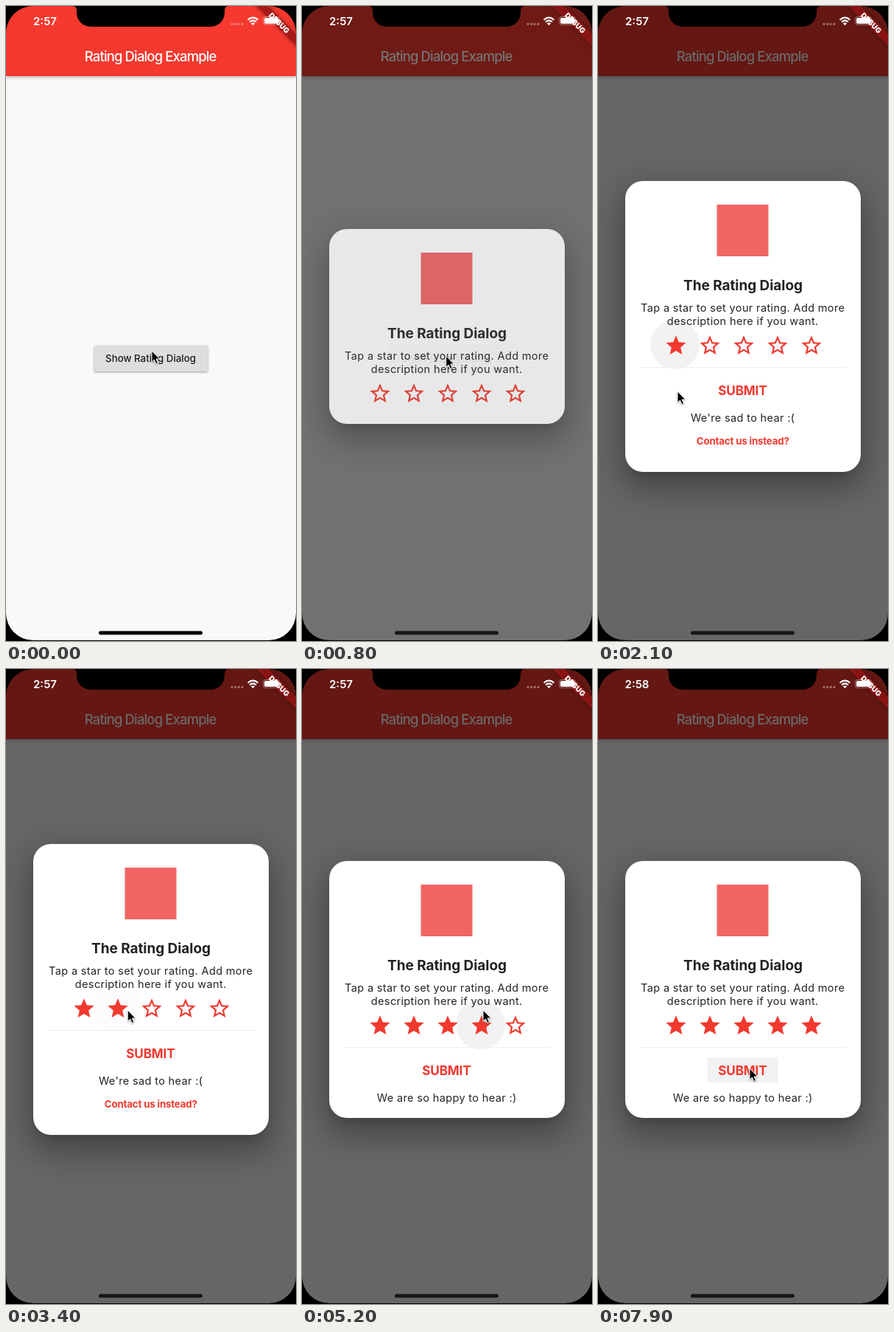
An HTML page that plays this animation: 394x860 px, repeating every 8 s.

```html
<!DOCTYPE html>
<html lang="en">
<head>
<meta charset="utf-8">
<title>Rating dialog</title>
<style>
  html, body { margin: 0; width: 100%; height: 100%; overflow: hidden; background: #000; }
  #stage { position: relative; width: 394px; height: 860px; overflow: hidden; background: #f9f9f9;
    font-family: Inter, Roboto, sans-serif; }
  #stage > * { position: absolute; }
  svg { position: absolute; left: 0; top: 0; overflow: visible; }
  text { text-anchor: middle; }
  #bar { width: 394px; height: 95px; background: #f5392f; box-shadow: 0 2px 4px rgba(0,0,0,.24); }
  #button { left: 120px; top: 460px; width: 154px; height: 34.5px; border-radius: 2px; background: #dedede;
    box-shadow: 0 1px 3px rgba(0,0,0,.4); }
  #ink { width: 100%; height: 100%; background: rgba(0,0,0,.1); }
  #scrim { width: 394px; height: 860px; background: #000; }
  #card { left: 36.5px; width: 320px; border-radius: 24px; background: #fff;
    box-shadow: 0 11px 15px -7px rgba(0,0,0,.14), 0 23px 40px 4px rgba(0,0,0,.2), 0 9px 46px 8px rgba(0,0,0,.13); }
  #card svg { left: -36.5px; }
  .body { font-size: 14.5px; letter-spacing: .36px; fill: #222; }
  .bold { font-weight: 700; }
  .red { fill: #f1392e; }
</style>
</head>
<body>
<div id="stage">
  <div id="bar"></div>
  <div id="button"><div id="ink"></div></div>
  <svg width="394" height="860">
    <text x="196.2" y="75" font-size="18.5" font-weight="500" letter-spacing="-.87" fill="#fff">Rating Dialog Example</text>
    <text x="196.5" y="482" font-size="13.3" font-weight="500" fill="#1c1c1c">Show Rating Dialog</text>
  </svg>
  <div id="scrim"></div>
  <div id="card">
    <svg width="394" height="400">
      <circle id="splash" r="33.5"/>
      <rect id="press" x="148.5" y="266" width="96" height="34" rx="2" fill="#f2f2f2"/>
      <rect x="161.5" y="32" width="70" height="70" fill="#f06563"/>
      <text class="bold" x="197" y="148" font-size="19" letter-spacing="-.06" fill="#222">The Rating Dialog</text>
      <text class="body" x="196.7" y="177">Tap a star to set your rating. Add more</text>
      <text class="body" x="196.7" y="195">description here if you want.</text>
      <g id="stars" class="red"></g>
      <g id="reply">
        <path d="M56 252.5H338" stroke="#eee"/>
        <text class="bold red" x="196.4" y="289.7" font-size="17.1" letter-spacing="-.15">SUBMIT</text>
        <text id="message" class="body" x="196.7" y="325.5"></text>
        <text id="contact" class="bold red" x="196.8" y="356.5" font-size="13.3" letter-spacing="-.18">Contact us instead?</text>
      </g>
    </svg>
  </div>
  <svg width="394" height="860">
    <defs><clipPath id="screen"><path d="M0 0H394V860H0z"/></clipPath></defs>
    <g clip-path="url(#screen)">
      <g transform="translate(394 0) rotate(45)">
        <path d="M-60 26.7H60V38H-60z" fill="#a31515" fill-opacity=".72" style="filter:drop-shadow(0 0 3px rgba(0,0,0,.5))"/>
      </g>
      <!-- status bar -->
      <text id="clock" x="53" y="26" font-size="15" font-weight="600" fill="#fff"></text>
      <g fill="#fff" fill-opacity=".35">
        <circle cx="307" cy="24.5" r="1.7"/><circle cx="311.7" cy="24.5" r="1.7"/>
        <circle cx="316.3" cy="24.5" r="1.7"/><circle cx="321" cy="24.5" r="1.7"/>
      </g>
      <g fill="none" stroke="#fff" stroke-width="2.2">
        <path d="M328.6 18.7Q335.5 12.6 342.4 18.7M331.1 21.6Q335.5 17.8 339.9 21.6"/>
      </g>
      <path d="M332.9 23.6Q335.5 21.5 338.1 23.6L335.5 26.3z" fill="#fff"/>
      <rect x="349.5" y="14.5" width="22" height="11" rx="3" fill="none" stroke="#fff" stroke-opacity=".4"/>
      <rect x="351" y="16" width="19" height="8" rx="1.8" fill="#fff"/>
      <path d="M373 18.2q2 1.8 0 3.6z" fill="#fff" fill-opacity=".5"/>
      <text transform="translate(394 0) rotate(45)" y="36" font-size="10" font-weight="900" fill="#fff">DEBUG</text>
      <!-- phone edge, notch and home indicator -->
      <path fill-rule="evenodd" d="M0 0H394V860H0zM37 0H357A37 37 0 0 1 394 37V822A37 37 0 0 1 357 859H37A37 37 0 0 1 0 822V37A37 37 0 0 1 37 0z"/>
      <path d="M90 0Q96 0 96 6V9A19 19 0 0 0 115 28H278A19 19 0 0 0 297 9V6Q297 0 303 0z"/>
      <rect id="home" x="126" y="846.5" width="141" height="5" rx="2.5"/>
    </g>
    <path id="cursor" d="M0 0V15.2L3.4 12L5.9 17.6L8.5 16.5L6.1 11H10.8z" stroke="#fff" stroke-width="1"
      style="filter:drop-shadow(0 1px 1px rgba(0,0,0,.35))"/>
  </svg>
</div>
<script>
const $ = id => document.getElementById(id);
const LOOP = 8000;
const STAR_Y = 222.8;
const starX = i => 106 + 46 * i;
const FULL = 'M12 17.27L18.18 21l-1.64-7.03L22 9.24l-7.19-.61L12 2 9.19 8.63 2 9.24l5.46 4.73L5.82 21z';
const HOLLOW = FULL + 'M12 15.4l-3.76 2.27 1-4.28-3.32-2.88 4.38-.38L12 6.1l1.71 4.04 4.38.38-3.32 2.88 1 4.28z';

const stars = [0, 1, 2, 3, 4].map(i => {
  const star = document.createElementNS('http://www.w3.org/2000/svg', 'path');
  star.setAttribute('transform', `translate(${starX(i)} ${STAR_Y}) scale(1.36) translate(-12 -12)`);
  star.setAttribute('fill-rule', 'evenodd');
  return $('stars').appendChild(star);
});

const rated = [2000, 3100, 4000, 5200, 6500];   // when each star fills
const pointer = [                               // time, x, y
  [0, 198, 467], [500, 195.7, 474], [1000, 195.7, 474], [1700, 108, 522], [2200, 108, 522],
  [2800, 155, 462], [3250, 155, 462], [3750, 202, 462], [4400, 202, 462], [4600, 212, 462],
  [5000, 246, 462], [5500, 246, 462], [6100, 289, 486], [6700, 289, 486], [7400, 206, 541], [LOOP, 206, 541]
];

const ramp = (t, a, b) => Math.min(1, Math.max(0, (t - a) / (b - a)));
const smooth = p => p * p * (3 - 2 * p);
const pulse = (t, a, b, c, d) => ramp(t, a, b) * (1 - ramp(t, c, d));

function pointerAt(t) {
  const i = pointer.findIndex(k => k[0] > t);
  const [t0, x0, y0] = pointer[i - 1], [t1, x1, y1] = pointer[i];
  const p = smooth(ramp(t, t0, t1));
  return [x0 + (x1 - x0) * p, y0 + (y1 - y0) * p];
}

function draw(t) {
  const count = rated.filter(at => t >= at).length;
  const [top, height] = count === 0 ? [302, 264] : count < 4 ? [236.5, 394.5] : [260, 348];
  const shown = ramp(t, 675, 825);

  $('ink').style.opacity = pulse(t, 450, 600, 700, 850);
  $('scrim').style.opacity = .59 * (1 - (1 - shown) ** 1.4);
  $('card').style.opacity = shown;
  $('card').style.top = top + 'px';
  $('card').style.height = height + 'px';
  $('home').setAttribute('fill', shown ? '#161616' : '#000');

  stars.forEach((star, i) => star.setAttribute('d', i < count ? FULL : HOLLOW));
  $('reply').style.display = count ? '' : 'none';
  $('contact').style.display = count < 4 ? '' : 'none';
  $('message').textContent = count < 4 ? "We're sad to hear :(" : 'We are so happy to hear :)';

  const tap = Math.max(0, rated.findIndex(at => t < at + 400));
  const at = rated[tap];
  $('splash').setAttribute('cx', starX(tap) - 1.5);
  $('splash').setAttribute('cy', STAR_Y - 1.3);
  $('splash').setAttribute('fill-opacity', .05 * pulse(t, at - 100, at, at + 120, at + 350));
  $('press').style.opacity = ramp(t, 7700, 7850);

  $('clock').textContent = t < 7400 ? '2:57' : '2:58';
  $('cursor').setAttribute('transform', `translate(${pointerAt(t)})`);
}

const start = performance.now();
function frame() {
  draw((performance.now() - start) % LOOP);
  requestAnimationFrame(frame);
}
frame();
</script>
</body>
</html>
```
